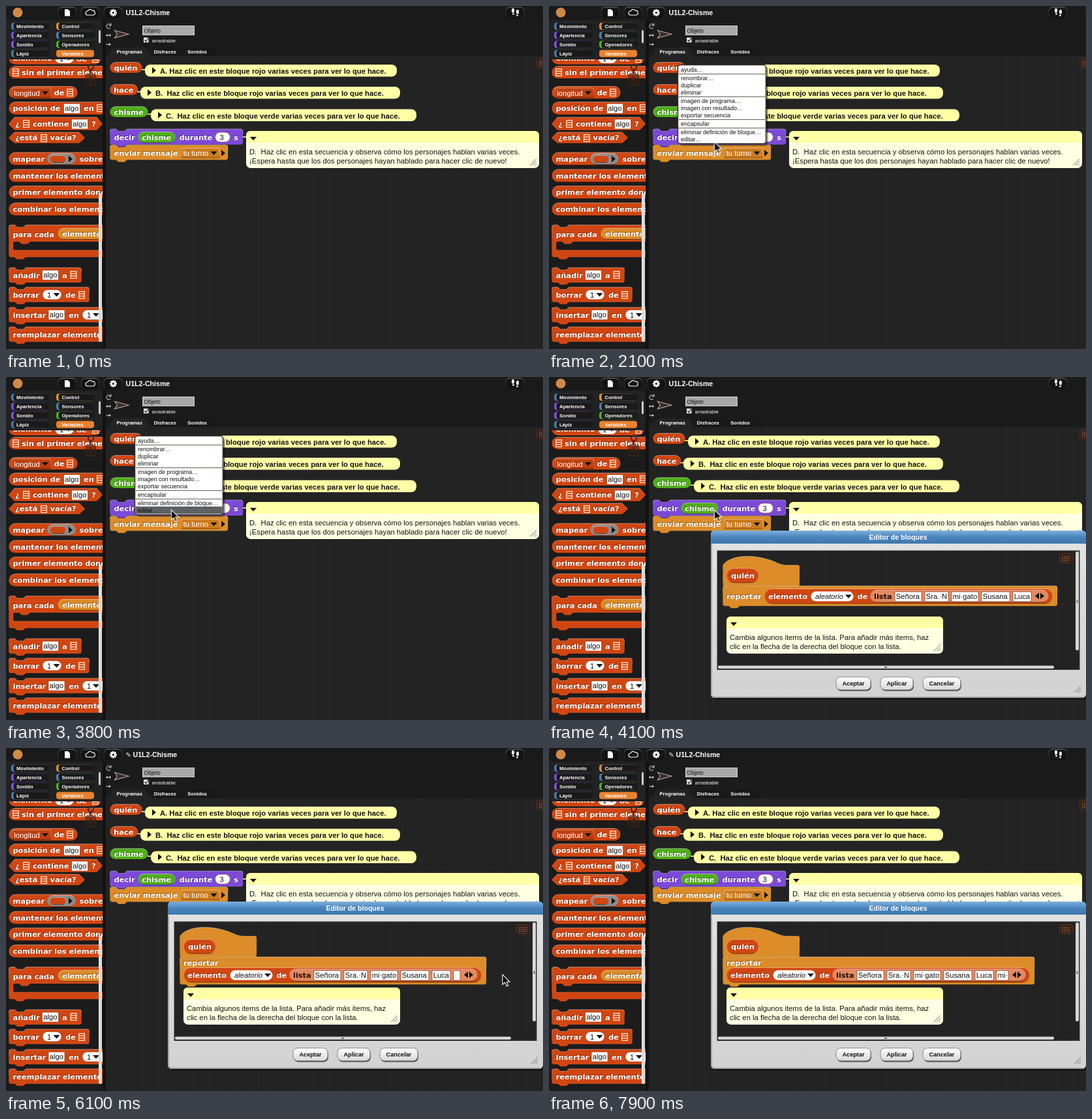
Write an HTML page that moves like this. It is 823 px wide and 527 px high and loops after 8000 ms.

```html
<!DOCTYPE html>
<html lang="es">
<head>
<meta charset="utf-8">
<title>Editor de bloques</title>
<style>
html, body { margin: 0; width: 100%; height: 100%; overflow: hidden; background: #141414; }
svg { display: block; width: 823px; height: 527px; }
text { font-family: "Liberation Sans", Arial, sans-serif; white-space: pre; }
.label { font: bold 11.35px "DejaVu Sans", Verdana, sans-serif; }
.step { animation: 8s step-end infinite; }
.menu { animation-name: menu; }
.hover { animation-name: hover; }
.dialog { animation-name: dialog; }
.saved { animation-name: saved; }
.edited { animation-name: edited; }
.row0 { animation-name: row0; }
.row1 { animation-name: row1; }
.row2 { animation-name: row2; }
.row3 { animation-name: row3; }
.row4 { animation-name: row4; }
.pointer { animation-name: pointer; }
.path { animation: path 8s ease-in-out infinite; }
@keyframes menu { 0% { opacity: 0 } 19.9% { opacity: 1 } 49.9%, to { opacity: 0 } }
@keyframes hover { 0% { opacity: 0 } 31.2% { opacity: 1 } 49.9%, to { opacity: 0 } }
@keyframes dialog { 0% { opacity: 0 } 49.9%, to { opacity: 1 } }
@keyframes saved { 0% { opacity: 1 } 68.7%, to { opacity: 0 } }
@keyframes edited { 0% { opacity: 0 } 68.7%, to { opacity: 1 } }
@keyframes row0 { 0% { opacity: 1 } 68.7%, to { opacity: 0 } }
@keyframes row1 { 0% { opacity: 0 } 68.7% { opacity: 1 } 94.9%, to { opacity: 0 } }
@keyframes row2 { 0% { opacity: 0 } 94.9% { opacity: 1 } 96.2%, to { opacity: 0 } }
@keyframes row3 { 0% { opacity: 0 } 96.2% { opacity: 1 } 98.6%, to { opacity: 0 } }
@keyframes row4 { 0% { opacity: 0 } 98.6%, to { opacity: 1 } }
@keyframes pointer { 0% { opacity: 0 } 1.2% { opacity: 1 } 94.9%, to { opacity: 0 } }
@keyframes path {
  0%, 1.25% { transform: translate(420px, 300px) }
  11.25%, 20% { transform: translate(197.5px, 87.5px) }
  26%, 30% { transform: translate(253.5px, 208.5px) }
  35%, 52% { transform: translate(253.5px, 204px) }
  65%, 69.5% { transform: translate(753px, 335px) }
  75%, 79% { transform: translate(761px, 348px) }
  88.5%, to { transform: translate(691px, 346px) }
}
</style>
</head>
<body>
<svg id="stage" viewBox="0 0 823 527" xmlns="http://www.w3.org/2000/svg"></svg>
<script>
const RED = '#d14612', ORANGE = '#dc8c28', PURPLE = '#7c4ad8', GREEN = '#50b01a';
const SALMON = '#e28a62', PAPER = '#ffffa6', BLACK = '#111';
const BOLD = 'font-weight="bold"', MIDDLE = 'text-anchor="middle"';
const BEVEL = 'stroke="url(#bevel)"';

const shape = (d, fill, attrs = '') => `<path d="${d}" fill="${fill}" ${attrs}/>`;
const line = (d, color, width = 1) => shape(d, 'none', `stroke="${color}" stroke-width="${width}"`);
const rect = (x, y, w, h, fill, r = 0, attrs = '') =>
  `<rect x="${x}" y="${y}" width="${w}" height="${h}" rx="${r}" fill="${fill}" ${attrs}/>`;
const text = (x, y, s, size, fill = '#fff', attrs = '') =>
  `<text x="${x}" y="${y}" font-size="${size}" fill="${fill}" ${attrs}>${s}</text>`;
const step = (name, content) => `<g class="step ${name}">${content}</g>`;

const label = (x, y, s) =>
  `<text class="label" x="${x - .8}" y="${y - .8}" fill="#000" opacity=".4">${s}</text>` +
  `<text class="label" x="${x}" y="${y}" fill="#fff">${s}</text>`;
const pill = (x, y, w, h, fill) =>
  rect(x + .5, y + .5, w - 1, h - 1, fill, Math.min(h / 2, 11), BEVEL);
const hexagon = (x, y, w, h) =>
  shape(`M${x} ${y + h / 2}l9 ${-h / 2}H${x + w - 9}l9 ${h / 2}l-9 ${h / 2}H${x + 9}z`, RED, BEVEL);
const notch = 'l4 3.5h9l4-3.5', tab = 'l-4 3.5h-9l-4-3.5';
const stack = (x, y, w, h, fill) => shape(
  `M${x} ${y + 3}q0-3 3-3h6${notch}H${x + w - 3}q3 0 3 3V${y + h - 3}q0 3-3 3H${x + 26}${tab}H${x + 3}q-3 0-3-3z`,
  fill, BEVEL);
const triDown = (x, y, w = 10) => shape(`M${x} ${y}h${w}l${-w / 2} 5.5z`, BLACK);
const triRight = (x, y, h = 10) => shape(`M${x} ${y}v${h}l6 ${-h / 2}z`, BLACK);
const listIcon = (x, y) =>
  shape(`M${x + .7} ${y + .7}h8.6v10.6h-8.6zm0 3.5h8.6m-8.6 3.5h8.6`, 'none', 'stroke="#ffe6cc" stroke-width="1.2"');
const slot = (x, y, w, s, h = 15) => rect(x, y, w, h, '#fff', 0, 'stroke="#8a3a1a" stroke-width=".7"') +
  text(x + 1.8, y + h - 4, s.replace('·', '<tspan fill="#533">·</tspan>'), 11.2, BLACK);
const number = (x, y, w, s) => rect(x, y, w, 15, '#fff', 7.5, 'stroke="#8a3a1a" stroke-width=".6"') +
  text(x + 7, y + 11.5, s, 11.2, BLACK);
const dropdown = (x, y, w, s, fill) => rect(x, y, w, 14.5, fill, 0, BEVEL) +
  text(x + 2.2, y + 11.7, s, 11.3) + triDown(x + w - 13, y + 5);

const foldedNote = (x, y, w, s) =>
  rect(x - 5, y + 7, 6, 1.5, PAPER) + rect(x, y, w, 18.5, PAPER, 8) +
  triRight(x + 11, y + 4) + text(x + 23, y + 14.3, s, 11.22, BLACK, BOLD);
const openNote = (x, y, w, lines) =>
  rect(x, y, w, 57, '#ffffe2', 7) +
  shape(`M${x} ${y + 18}v-11q0-7 7-7h${w - 14}q7 0 7 7v11z`, PAPER) + triDown(x + 6, y + 9) +
  lines.map((s, i) => text(x + 5, y + 36 + i * 13.5, s, 11.25, BLACK)).join('') +
  line(`M${x + w - 14} ${y + 53}l10-10m-6 10l6-6m-2 6l2-2`, '#777');

function defs() {
  const gradient = (id, ...stops) => `<linearGradient id="${id}" x2="0" y2="1">` +
    stops.map(([c, a], i) => `<stop offset="${i / (stops.length - 1)}" stop-color="${c}" stop-opacity="${a}"/>`).join('') +
    '</linearGradient>';
  return '<defs>' +
    gradient('bevel', ['#fff', .4], ['#fff', .05], ['#000', .45]) +
    gradient('blue', ['#7fb0dc', 1], ['#4a84bd', 1], ['#3f78ae', 1]) +
    gradient('grey', ['#e2e2e2', 1], ['#d2d2d2', 1]) +
    gradient('button', ['#fff', 1], ['#d8d8d8', 1]) +
    '<pattern id="weave" width="4" height="4" patternUnits="userSpaceOnUse">' +
    rect(0, 0, 4, 4, '#242424') + rect(0, 0, 1, 4, '#212121') + '</pattern>' +
    '<clipPath id="paletteClip"><rect y="82" width="148" height="445"/></clipPath></defs>';
}

function topBar() {
  const title = (x, s) => text(x, 13.8, s, 10.6, '#fff', BOLD);
  const gear = [0, 45, 90, 135].map(a =>
    rect(163.2, 4.8, 2.4, 11, '#fff', 0, `transform="rotate(${a} 164.4 10.3)"`)).join('');
  return rect(0, 0, 823, 21, '#1a1a1a') + '<circle cx="18" cy="10" r="7.5" fill="#d08a48"/>' +
    [80, 115, 150, 766].map(x => rect(x, 2, 28, 16, '#141414', 6, BEVEL)).join('') +
    shape('M90 5h5l3 3v7.5h-8z', '#fff') +
    shape('M125 14a3 3 0 0 1 0-6a4 4 0 0 1 7-1a3.5 3.5 0 0 1 1.5 7z', 'none', 'stroke="#fff" stroke-width="1.1"') +
    gear + '<circle cx="164.4" cy="10.3" r="4" fill="#fff"/><circle cx="164.4" cy="10.3" r="1.6" fill="#111"/>' +
    '<g fill="#fff"><ellipse cx="777" cy="7" rx="2" ry="3.4"/><ellipse cx="777.5" cy="12.3" rx="1.4" ry="1.3"/>' +
    '<ellipse cx="784" cy="9" rx="2" ry="3.4"/><ellipse cx="783.5" cy="14.5" rx="1.4" ry="1.3"/></g>' +
    step('saved', title(183.5, 'U1L2-Chisme')) +
    step('edited', text(183.5, 13.5, '✎', 10, '#fff', 'style="font-family:\'DejaVu Sans\',sans-serif"') + title(194.5, 'U1L2-Chisme'));
}

function categories() {
  const items = [['Movimiento', '#4a7cb0'], ['Apariencia', '#7c50e0'], ['Sonido', '#8a50e0'], ['Lápiz', '#4a7c9c'],
    ['Control', '#e09030'], ['Sensores', '#4a80b0'], ['Operadores', '#50b020'], ['Variables', '#e8822e']];
  return rect(0, 21, 148, 61, '#222') + items.map(([name, color], i) => {
    const x = i < 4 ? 8 : 77, y = 25.5 + i % 4 * 14;
    return rect(x, y, 58, 11, color, 4) + (i < 7 ? rect(x + 3.5, y, 55, 11, '#1a1a1a', 4) : '') +
      text(x + (i < 4 ? 8 : 8.5), y + 8.4, name, 7.55, '#fff', BOLD);
  }).join('') + rect(142, 37, 3, 20, '#ccc', 1.5);
}

function palette() {
  const reporter = (y, s, w = 160) => pill(4, y, w, 20.5, RED) + label(10.5, y + 14, s);
  const command = (y, s, w = 160) => stack(4.5, y, w, 23, RED) + label(10.5, y + 16, s);
  const tools = rect(122, 105, 15.5, 16, '#2a1a14', 2, 'fill-opacity=".45" stroke="#4a2a1c"') +
    '<g fill="none" stroke="#3c2218" stroke-width="1.8"><circle cx="130" cy="94" r="4"/>' +
    '<path d="M130 98v6M125 113h10M130 108v10"/></g>';
  return '<g clip-path="url(#paletteClip)">' + rect(0, 82, 148, 445, '#1c1c1c') +
    reporter(70, 'elemento', 142) + number(75, 73, 29, '1') + triDown(91, 78) + label(108, 85, 'de') + listIcon(132, 75) +
    pill(4, 92, 160, 20, RED) + listIcon(10, 96) + label(24, 106, 'sin el primer elemento') +
    pill(4, 123, 106, 20, RED) + dropdown(10, 126, 58, 'longitud', '#bd3f10') + label(73.5, 137, 'de') + listIcon(93, 127) +
    reporter(147, 'posición de') + slot(88.5, 150, 25, 'algo') + label(119, 161, 'en') + listIcon(139, 151) +
    hexagon(4, 171, 144, 20) + label(14, 185, '¿') + listIcon(26, 175) + label(41, 185, 'contiene') +
    slot(100.5, 174, 25, 'algo') + label(131, 185, '?') +
    hexagon(4, 194, 117, 17) + label(14, 206, '¿está') + listIcon(53, 197) + label(67.5, 206, 'vacía?') +
    reporter(224.5, 'mapear') + pill(63, 226, 44, 18, '#8c8c8c') + pill(67, 229, 25, 12, RED) +
    triRight(96, 230) + label(112.5, 238.5, 'sobre') +
    reporter(250.5, 'mantener los elementos') + reporter(276, 'primer elemento donde') + reporter(302, 'combinar los elementos') +
    shape(`M4.5 339.5q0-3 3-3h6${notch}H165V362H37${tab}H13q-2 0-2 2v9q0 2 2 2H165V386H30${tab}H7.5q-3 0-3-3z`, RED, BEVEL) +
    label(10.5, 354.5, 'para cada') + pill(79, 341, 90, 18, ORANGE) + label(86, 354, 'elemento') +
    command(402, 'añadir', 111) + slot(55.5, 406, 25, 'algo') + label(86, 418, 'a') + listIcon(98.5, 407) +
    command(432, 'borrar', 123) + number(56, 436, 29, '1') + triDown(72.5, 441) + label(91, 448, 'de') + listIcon(111, 438) +
    command(463, 'insertar') + slot(65, 467, 25, 'algo') + label(96, 479, 'en') + number(117, 467, 40, '1') + triDown(133, 472) +
    command(493, 'reemplazar elemento') +
    rect(142, 288, 5, 228, '#dcdcdc', 2) + tools + '</g>';
}

function spriteBar() {
  const tabShape = (x, w, fill) => shape(`M${x - 9} 77q7 0 10-9q2-4.5 6-4.5h${w}q5 0 7 5q4 8.5 10 8.5z`, fill);
  return rect(148, 21, 5, 506, '#121212') + rect(153, 21, 670, 56, '#1b1b1b') +
    line('M160 33.5a3.5 3.5 0 1 1 .5-4m.5-3v3.5h-3.5', '#ddd') +
    line('M153.5 45h7', '#ddd') + shape('M153 45l2.5-2v4zM161 45l-2.5-2v4z', '#ddd') +
    line('M153.5 59h5', '#ddd') + shape('M161 59l-3-2v4z', '#ddd') +
    shape('M166.5 37.5l21.5 5.8l-21.5 5.8l4-5.8z', '#3a2c26', 'stroke="#b8aaa2" stroke-width="1.1"') +
    rect(209.5, 30.5, 79, 14, '#a9a9a9', 0, 'stroke="#ccc"') + text(211.5, 41, 'Objeto', 8.6, BLACK) +
    rect(211, 48.5, 7.5, 7.5, '#eee') + line('M212.5 52l2 2.5l4-6', '#222', 1.3) + text(223.8, 55.8, 'arrastrable', 7.55) +
    tabShape(283, 24, '#181818') + tabShape(231, 25, '#181818') + tabShape(161, 41, '#242424') +
    [[169.5, 'Programas'], [226.8, 'Disfraces'], [278.3, 'Sonidos']].map(([x, s]) => text(x, 73, s, 7.55, '#fff', BOLD)).join('');
}

const keyboard = (x, y) => rect(x + .5, y + .5, 20, 14, '#332018', 3, 'stroke="#5a3524"') +
  `<path d="M${x + 4} ${y + 5}h13m-13 3h13m-13 3h13" stroke="#8a5a3c" stroke-width="1.5" stroke-dasharray="2 1"/>`;

function scripts() {
  const tail = 'en este bloque rojo varias veces para ver lo que hace.';
  return rect(153, 77, 670, 450, 'url(#weave)') + keyboard(813, 80) +
    foldedNote(213, 90, 386, `A. Haz clic ${tail}`) + pill(159, 86, 50, 17.5, RED) + label(165.5, 98.5, 'quién') +
    foldedNote(206, 124, 398, `B.  Haz clic ${tail}`) + pill(159, 120, 43.5, 17.5, RED) + label(165, 132.5, 'hace') +
    foldedNote(222, 158.5, 407, `C.  Haz clic ${tail.replace('rojo', 'verde')}`) +
    pill(159, 154, 59, 17.5, GREEN) + label(165.5, 166.8, 'chisme') +
    stack(159.5, 213.5, 180.5, 23, ORANGE) + stack(159.5, 189, 203.5, 24, PURPLE) +
    label(165.5, 206, 'decir') + pill(202, 193, 58, 17.5, GREEN) + label(208, 206, 'chisme') + label(265.5, 206, 'durante') +
    number(320.5, 194, 23, '3') + label(349, 206, 's') +
    label(165.5, 230, 'enviar mensaje') + dropdown(269.5, 218.5, 57, 'tu turno', '#cc7c20') + triRight(330, 221) +
    rect(363, 200.5, 6, 1.5, PAPER) +
    openNote(368, 192, 449, ['D.  Haz clic en esta secuencia y observa cómo los personajes hablan varias veces.',
      '¡Espera hasta que los dos personajes hayan hablado para hacer clic de nuevo!']);
}

function menu() {
  const items = [[101, 'ayuda…'], [114, 'renombrar…'], [125, 'duplicar'], [136, 'eliminar'], [149, 'imagen de programa…'],
    [160, 'imagen con resultado…'], [171, 'exportar secuencia'], [184, 'encapsular'],
    [197, 'eliminar definición de bloque…'], [208, 'editar…']];
  return rect(200, 93, 136, 122, '#000', 5, 'opacity=".35"') +
    rect(197.5, 90.5, 135, 121, '#fff', 4, 'stroke="#3a2a22" stroke-width="1.5"') +
    [104.5, 139.5, 174.5, 187.5].map(y => line(`M199 ${y}h132`, '#666052')).join('') +
    step('hover', rect(198.5, 199, 133, 11, '#5c6262')) +
    items.map(([y, s]) => text(202, y, s, 9, BLACK)).join('');
}

// Coordinates are for the wrapped layout; the single-line layout shifts the inner blocks.
function reportBlock(item, itemWidth) {
  const wrapped = item !== undefined;
  const slots = [[472, 41, 'Señora'], [518, 36, 'Sra.·N'], [559, 41, 'mi·gato'], [605, 43, 'Susana'], [653, 28, 'Luca']];
  if (wrapped) slots.push([686, itemWidth, item]);
  const [lastX, lastW] = slots.at(-1), end = lastX + lastW;
  const dx = wrapped ? 0 : 58, dy = wrapped ? 0 : -12;
  return stack(266.5, 321, end + 40 + dx - 266.5, wrapped ? 42.5 : 31, ORANGE) +
    label(272, wrapped ? 334 : 341, 'reportar') +
    `<g transform="translate(${dx} ${dy})">` +
    pill(272, 337, end + 33 - 272, 23.5, RED) + label(278, 353, 'elemento') +
    rect(343.5, 341.5, 65, 15, '#fff', 7.5) + text(350, 353, 'aleatorio', 11.2, BLACK, 'font-style="italic"') +
    triDown(396, 346.5) + label(414.5, 353, 'de') + pill(434, 339, end + 27 - 434, 19.5, SALMON) +
    `<text class="label" x="440" y="352.5" fill="#2a0c04">lista</text>` +
    slots.map(([x, w, s]) => slot(x, 342, w, s)).join('') +
    shape(`M${end + 12} 343.5v10l-6-5zm2 0v10l6-5z`, BLACK) + '</g>';
}

function dialog() {
  const button = (x, w, s) => rect(x + 1, 462.5, w, 20, '#555', 7) +
    rect(x, 461, w, 19.5, 'url(#button)', 7, 'stroke="#888"') + text(x + w / 2, 474.3, s, 9.2, BLACK, `${BOLD} ${MIDDLE}`);
  const states = [[], ['', 10], ['m', 12.5], ['mi', 15], ['mi·', 18]];
  return rect(251, 240, 575, 256, '#000', 7, 'opacity=".35"') +
    rect(248, 236, 575, 257, 'url(#grey)', 6) + line('M249 257V487q0 5 5 5H818', '#a6a6a6', 2) +
    shape('M248 256v-14q0-6 6-6H817q6 0 6 6v14z', 'url(#blue)') +
    text(535, 250, 'Editor de bloques', 10.55, '#fff', `${BOLD} ${MIDDLE}`) +
    rect(258, 267, 555, 182.5, 'url(#weave)', 0, 'stroke="#333"') + keyboard(782, 271) +
    shape('M266.5 321V289C280 271 320 273 346 284Q356 289 364 289H381q3 0 3 3V321H292.5l-4 3.5h-9l-4-3.5z', ORANGE, BEVEL) +
    pill(272, 293.5, 49.5, 23, RED) + label(279, 309, 'quién') +
    states.map((state, i) => step(`row${i}`, reportBlock(...state))).join('') +
    openNote(272, 368, 332, ['Cambia algunos items de la lista. Para añadir más items, haz',
      'clic en la flecha de la derecha del bloque con la lista.']) +
    rect(807, 268, 5, 152, '#d6d6d6', 2.5) + rect(259, 443.5, 515, 4.5, '#d6d6d6', 2) +
    rect(808.5, 343, 2, 4, '#666') + rect(514, 445, 4, 2, '#666') +
    button(440, 53, 'Aceptar') + button(508, 50, 'Aplicar') + button(573, 58, 'Cancelar') +
    line('M805 485l10-10m-6.5 10l6.5-6.5m-3 6.5l3-3', '#777');
}

const pointer = step('pointer', '<g class="path">' +
  shape('M0 0V15.5L3.6 12.2L6.3 18L8.8 16.9L6.2 11.3H11z', '#000', 'stroke="#fff" stroke-width="1.1"') + '</g>');

document.getElementById('stage').innerHTML = defs() + topBar() + categories() + palette() + spriteBar() + scripts() +
  step('menu', menu()) + step('dialog', dialog()) + pointer;
</script>
</body>
</html>
```
